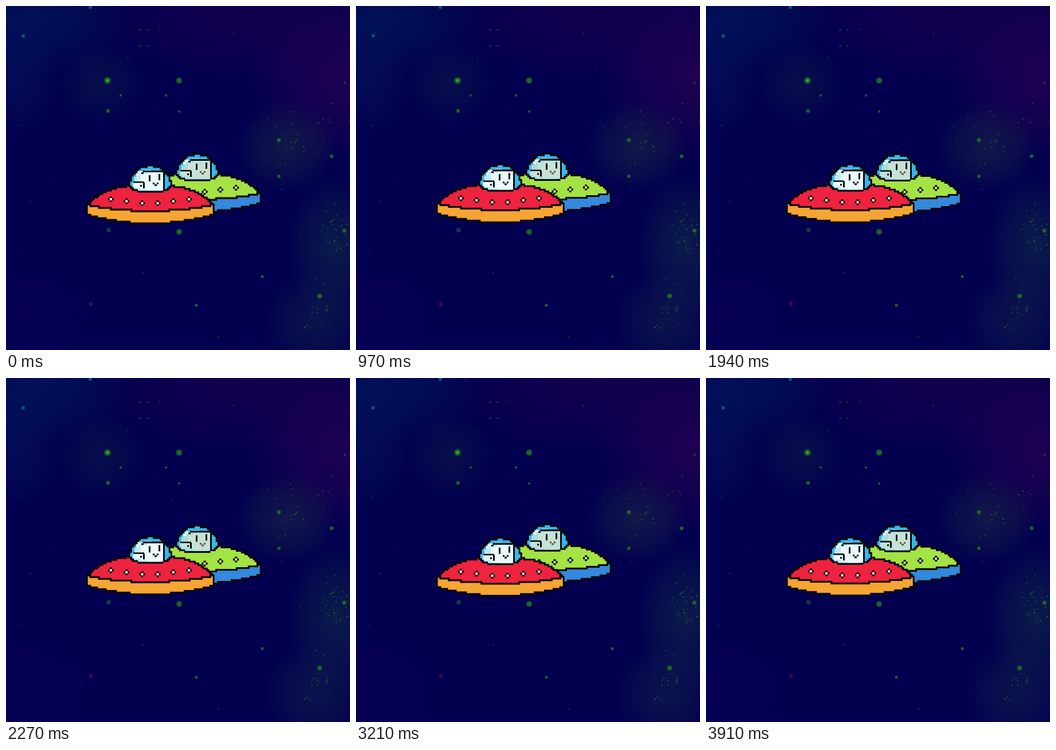
Write an HTML page with a canvas that moves like this. It is 600 by 600 pixels and loops after 3940 ms.

```html
<!DOCTYPE html>
<html lang="en">
<head>
<meta charset="utf-8">
<title>Saucers in space</title>
<style>
html, body { margin: 0; width: 100%; height: 100%; overflow: hidden; background: #02004f; }
canvas { display: block; width: 600px; height: 600px; }
</style>
</head>
<body>
<canvas id="stage" width="600" height="600"></canvas>
<script>
const LOOP = 3940, TICK = 30, CELL = 3, INK = '#08070c';
const stage = document.getElementById('stage').getContext('2d');

// Vertical bobbing as [time, offset], eased between turning points
const redBob = [[0, 0], [250, .4], [1000, -1.7], [2250, -1.7], [3200, .8], [LOOP, .2]];
const greenBob = [[0, 0], [300, -1.8], [1600, .8], [3200, -2.8], [LOOP, -1.8]];

function bob(keys, t) {
  const i = keys.findIndex(k => k[0] > t);
  const [t0, a] = keys[i - 1], [t1, b] = keys[i];
  return a + (b - a) * (1 - Math.cos(Math.PI * (t - t0) / (t1 - t0))) / 2;
}

// ---- Sky ----
function glow(c, x, y, rx, ry, rgb, alpha) {
  c.save();
  c.translate(x, y);
  c.scale(rx, ry);
  const g = c.createRadialGradient(0, 0, 0, 0, 0, 1);
  g.addColorStop(0, `rgba(${rgb},${alpha})`);
  g.addColorStop(.55, `rgba(${rgb},${alpha * .55})`);
  g.addColorStop(1, `rgba(${rgb},0)`);
  c.fillStyle = g;
  c.fillRect(-1, -1, 2, 2);
  c.restore();
}

function dot(c, x, y, r, color, alpha) {
  c.globalAlpha = alpha;
  c.fillStyle = color;
  c.beginPath();
  c.arc(x, y, r, 0, 7);
  c.fill();
  c.globalAlpha = 1;
}

function star(c, x, y, r, color = '#237026') {
  dot(c, x, y, r * 1.4, color, .3);
  dot(c, x, y, r, color, .85);
}

function makeSky() {
  const cv = document.createElement('canvas');
  cv.width = cv.height = 600;
  const c = cv.getContext('2d');
  c.fillStyle = '#02004f';
  c.fillRect(0, 0, 600, 600);
  glow(c, 590, 125, 170, 150, '40,0,82', .75);
  glow(c, 420, 10, 270, 130, '30,0,76', .6);
  glow(c, 50, 20, 170, 100, '0,28,92', .65);
  glow(c, 20, 120, 75, 110, '4,22,94', .55);
  glow(c, 165, 135, 75, 75, '10,26,72', .55);
  glow(c, 490, 245, 90, 80, '24,34,70', .7);
  glow(c, 575, 420, 85, 130, '14,38,72', .7);
  glow(c, 540, 550, 90, 90, '16,34,74', .6);
  glow(c, 30, 540, 170, 120, '12,0,86', .5);

  let seed = 11;
  const rnd = () => (seed = seed * 16807 % 2147483647) / 2147483647;
  const dust = (x, y, w, h, n) => {
    while (n--)
      dot(c, x + (rnd() + rnd() - 1) * w, y + (rnd() + rnd() - 1) * h, .7 + rnd(), '#28602c', .3 + rnd() * .5);
  };
  dust(490, 240, 60, 70, 26);
  dust(570, 180, 35, 75, 16);
  dust(575, 390, 35, 60, 42);
  dust(545, 520, 32, 65, 30);
  for (let i = 0; i < 24; i++)
    dot(c, rnd() * 600, rnd() * 600, 1 + rnd(), i % 3 ? '#183f43' : '#380c50', .6);

  for (const [x, y, r] of [
    [177, 130, 5], [302, 130, 4.5], [302, 394, 4.3], [178, 183, 2.8], [302, 184, 1.8], [279, 156, 1.8],
    [200, 156, 1.8], [476, 234, 3], [476, 297, 2.5], [568, 262, 2.8], [447, 472, 2.2], [332, 522, 2.2],
    [547, 506, 3.6], [590, 392, 3]
  ]) star(c, x, y, r);
  for (const x of [234, 247]) for (const y of [42, 70]) star(c, x, y, 1.6, '#183f43');
  star(c, 30, 52, 2.6, '#0d6672');
  star(c, 147, 2, 2.6, '#0d6672');
  star(c, 179, 391, 3.6, '#183f43');
  star(c, 148, 520, 3.2, '#380c50');
  dot(c, 177, 130, 2.4, '#41a52b', 1);
  return cv;
}

// ---- Saucers ----
// Staircase arch from left to right; a negative height hangs below the base.
function arch(cx, half, base, height, power, root = 1) {
  const n = Math.round(2 * half / CELL), w = 2 * half / n, points = [];
  for (let i = 0; i < n; i++) {
    const x = cx - half + i * w, u = Math.abs(x + w / 2 - cx) / half;
    const rise = height * (1 - u ** power) ** (1 / root);
    const y = base - Math.round(rise / CELL) * CELL;
    points.push([x, y], [x + w, y]);
  }
  return points;
}

function shape(top, bottom, fill, outline = true) {
  const c = stage;
  c.beginPath();
  for (const p of [...top, ...[...bottom].reverse()]) c.lineTo(...p);
  c.closePath();
  c.fillStyle = fill;
  c.fill();
  if (!outline) return;
  c.lineWidth = 3;
  c.strokeStyle = INK;
  c.stroke();
}

function rects(color, ...list) {
  stage.fillStyle = color;
  for (const r of list) stage.fillRect(...r);
}

const hull = {
  top: arch(251.7, 110.5, 346, 33, 3.2),
  seam: arch(251.7, 110.5, 346, -11, 2.5),
  base: arch(251.7, 110.5, 364, -15, 2)
};
const dome = {
  top: arch(251.7, 36.5, 317, 38, 2.3, 2),
  base: arch(251.7, 36.5, 315, -9, 3)
};
const glass = {
  top: arch(248, 27, 316, 29, 2.3, 2),
  base: arch(248, 27, 316, -6, 3)
};

function lamp(x, y, color) {
  rects(INK, [x - 2, y - 5, 4, 10], [x - 5, y - 2, 10, 4]);
  rects(color, [x - 2, y - 2, 4, 4]);
}

function pilot(p) {
  shape(dome.top, dome.base, '#39b7eb');
  shape(glass.top, glass.base, p.glass, false);
  rects(p.skin, [246, 290, 28, 32], [235, 293, 12, 27], [223, 308, 18, 9]);
  rects('#f4fdff', [230, 288, 7, 4], [227, 292, 5, 4]);
  rects(INK,
    [239, 287, 35, 3], [274, 290, 3, 30], [236, 290, 4, 3],   // visor
    [222, 306, 19, 2.5], [239, 308, 3, 10], [234, 312, 3, 3], // arm
    [249, 295, 3, 11], [266, 293, 3, 11]);                    // eyes
  rects(p.mouth, [256, 308, 3, 3], [259, 311, 4, 3], [263, 308, 3, 3]);
}

function saucer(p, x, y) {
  stage.save();
  stage.translate(x, y);
  shape(hull.seam, hull.base, p.rim);
  shape(hull.top, hull.seam, p.body);
  for (let k = 0; k < 3; k++)
    for (const side of [-1, 1])
      lamp(251 + side * (13.5 + 27.3 * k), 344 - 3.5 * k, p.lamp);
  pilot(p);
  stage.restore();
}

const red = { body: '#ee233f', rim: '#f5a533', lamp: '#fff5d4', glass: '#bfe9f8', skin: '#ebfaff', mouth: INK };
const green = { body: '#a4e344', rim: '#3488dd', lamp: '#c9ee83', glass: '#a9dcd8', skin: '#c5e2d7', mouth: '#7b4a3b' };

const sky = makeSky();
const start = performance.now();

function frame() {
  const t = Math.floor((performance.now() - start) % LOOP / TICK) * TICK;
  stage.drawImage(sky, 0, 0);
  saucer(green, 82, bob(greenBob, t) - 20);
  saucer(red, 0, bob(redBob, t));
  requestAnimationFrame(frame);
}
frame();
</script>
</body>
</html>
```
